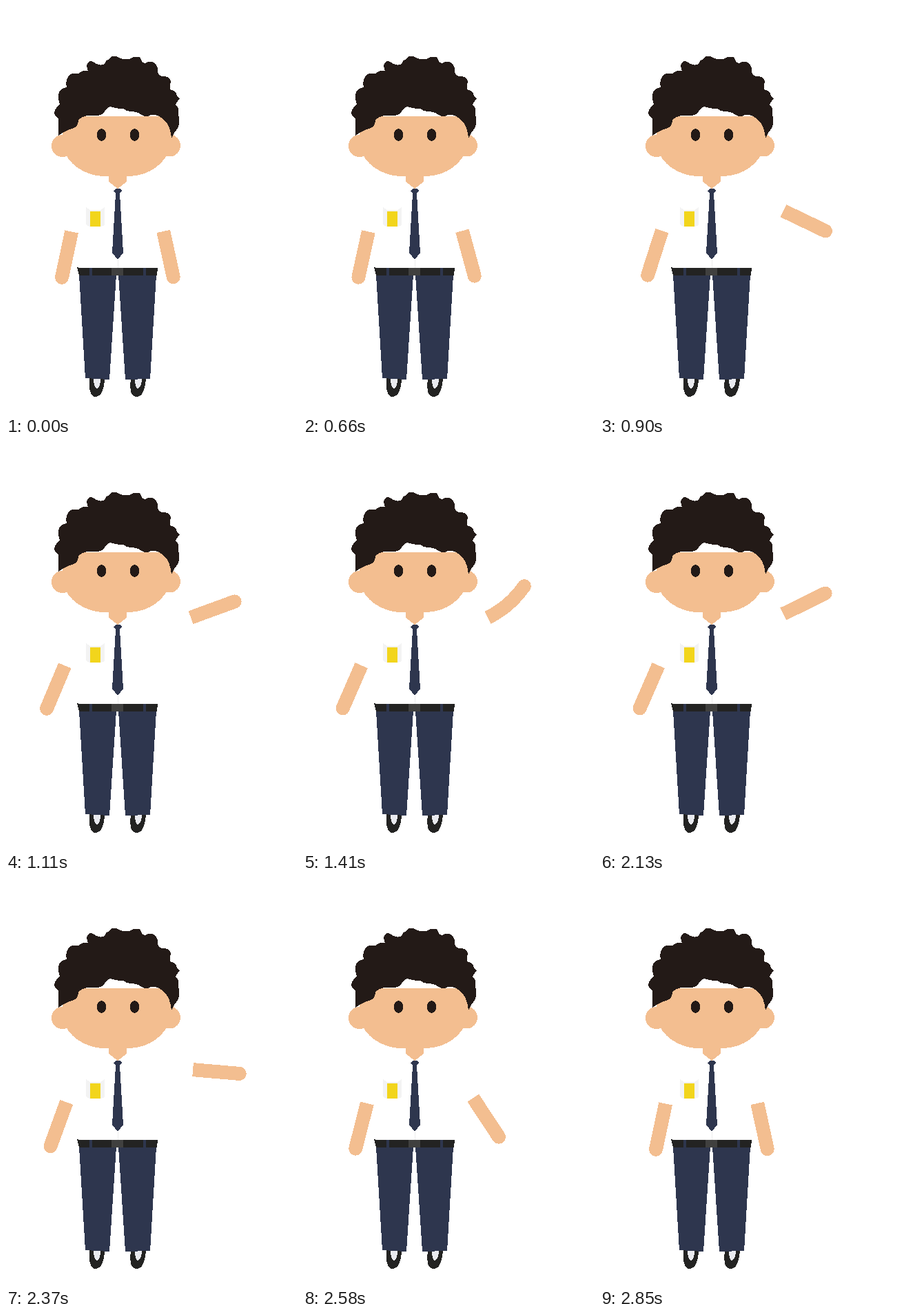
An HTML page that plays this animation: 422 by 592 pixels, repeating every 3300 ms.

```html
<!DOCTYPE html>
<html lang="en">
<head>
<meta charset="utf-8">
<title>Waving student</title>
<style>
  html, body { margin: 0; width: 100%; height: 100%; overflow: hidden; background: #fff; }
  svg { display: block; width: 100vw; height: 100vh; }
  .skin { fill: #f3be90; }
  .hair { fill: #231a17; }
  .navy { fill: #2e364e; }
  .belt { fill: #232322; }
  .sock { fill: #e9eaef; }
  .arm { fill: none; stroke: #f3be90; stroke-width: 20; }
</style>
</head>
<body>
<svg viewBox="0 0 422 592" shape-rendering="crispEdges">
  <g id="legs">
    <path class="belt" d="M121 540H143C143 553 139 567 130 567C122 567 120 556 121 540Z"/>
    <path class="belt" d="M181 540H203C202 553 199 567 190 567C181 567 179 558 181 540Z"/>
    <path class="sock" d="M127 540H137C137 549 135 555 132 555C129 555 127 549 127 540Z"/>
    <path class="sock" d="M187 540H197C197 549 194 555 191 555C188 555 187 549 187 540Z"/>
    <path class="navy" d="M106 390H160L150 542L115 540ZM163 390H218L209 541L173 542Z"/>
    <path class="belt" d="M103 379L107 380H220L219 391H106Z"/>
    <path class="navy" d="M121 380h4v11h-4zM199 380h4v11h-4z"/>
    <path fill="#40403f" d="M153 380h17v11h-17z"/>
  </g>
  <g id="arms">
    <path class="arm" id="leftArm"/><circle class="skin" id="leftHand" r="10"/>
    <path class="arm" id="rightArm"/><circle class="skin" id="rightHand" r="10"/>
  </g>
  <g id="shirt">
    <path class="skin" d="M149 243H175V255L162 265L149 255Z"/>
    <path stroke="#ececec" d="M162.5 368V380"/>
    <path class="navy" d="M156 268L159 265H166L168 268L165 272L170 358L162 368L154 358L159 272Z"/>
    <path fill="#f3f3f3" d="M116 292L122 296H137L143 292V318L138 320H121L116 317Z"/>
    <rect fill="#f2d51c" x="122" y="298" width="15" height="22"/>
  </g>
  <g id="head">
    <circle class="skin" cx="82" cy="203" r="16"/>
    <circle class="skin" cx="237" cy="202.500" r="16"/>
    <path class="skin" d="M80 160H240L238 205C232 228 207 247 178 247H142C115 247 87 228 83 205Z"/>
    <path class="hair" d="M76 188V163Q70 160 70 154Q72 147 78 143Q76 138 76 129Q77 120 88 118
      Q86 110 90 103Q93 96 105 98Q112 92 119 94Q115 85 120 81Q124 78 131 84Q138 87 143 84
      Q145 78 149 78Q153 71 160 73Q166 77 172 77Q179 78 183 75Q189 72 195 75Q197 83 202 83
      Q208 79 215 82Q222 89 220 96Q222 103 230 102Q238 103 239 110Q236 120 240 122
      Q247 123 248 131L252 134Q246 141 246 144Q252 147 250 158Q253 168 249 177Q244 183 240 192
      Q238 170 225 162Q215 155 208 159Q202 162 195 157Q190 153 180 153Q174 152 170 149
      Q159 149 152 146Q146 147 142 155Q135 161 122 159Q110 159 105 166Q104 176 98 177Q86 181 76 188Z"/>
    <ellipse class="hair eye" cx="138.500" cy="187" rx="6.700" ry="8.800"/>
    <ellipse class="hair eye" cx="186.500" cy="187" rx="6.700" ry="8.800"/>
  </g>
</svg>
<script>
  const LOOP = 3300, STEP = 30;
  const SLEEVE = 54.7, REACH = 122.5;
  const BLINKS = [150, 330, 1200, 2160], BLINK_TIME = 180;

  // [time, angle in degrees below the horizontal]
  const LEFT = [[600, 102], [1200, 113.5], [2150, 113.5], [2755, 102]];
  const ELBOW = [[600, 77.7], [1200, -26.4], [1400, -20], [1600, -17.5], [1800, -17.5],
                 [2000, -18], [2150, -26.4], [2755, 77.7]];
  const HAND = [[600, 77.7], [1200, -26.4], [1400, -31.8], [1600, -18], [1800, -27.5],
                [2000, -20], [2150, -26.4], [2755, 77.7]];

  const $ = id => document.getElementById(id);
  const eyes = document.querySelectorAll('.eye');
  const ease = u => u * u * (3 - 2 * u);

  function track(keys, t) {
    if (t <= keys[0][0]) return keys[0][1];
    for (let i = 1; i < keys.length; i++) {
      const [t0, a] = keys[i - 1], [t1, b] = keys[i];
      if (t < t1) return a + (b - a) * ease((t - t0) / (t1 - t0));
    }
    return keys[keys.length - 1][1];
  }

  function polar(x, y, r, deg) {
    const a = deg * Math.PI / 180;
    return [x + r * Math.cos(a), y + r * Math.sin(a)];
  }

  // Bare part of an arm, from the sleeve edge to the hand, bowed when the angles differ
  function drawArm(side, x, y, elbow, hand) {
    const [x0, y0] = polar(x, y, SLEEVE, elbow);
    const [x1, y1] = polar(x, y, REACH, hand);
    const chord = Math.atan2(y1 - y0, x1 - x0);
    const bow = Math.tan((chord - elbow * Math.PI / 180) * 0.7) / 2;
    const cx = (x0 + x1) / 2 - (y1 - y0) * -bow;
    const cy = (y0 + y1) / 2 - (x1 - x0) * bow;
    $(side + 'Arm').setAttribute('d', `M${x0} ${y0}Q${cx} ${cy} ${x1} ${y1}`);
    $(side + 'Hand').setAttribute('cx', x1);
    $(side + 'Hand').setAttribute('cy', y1);
  }

  function eyeOpen(t) {
    const start = BLINKS.find(b => t >= b && t < b + BLINK_TIME);
    if (start === undefined) return 1;
    return 1 - 0.9 * ease(1 - Math.abs((t - start) / BLINK_TIME * 2 - 1));
  }

  function draw(time) {
    const t = Math.floor((time % LOOP) / STEP) * STEP;
    const left = track(LEFT, t);
    drawArm('left', 106.5, 274, left, left);
    drawArm('right', 216.6, 273.5, track(ELBOW, t), track(HAND, t));
    const ry = 8.8 * eyeOpen(t);
    eyes.forEach(eye => eye.setAttribute('ry', ry));
  }

  let began;
  function tick(now) {
    began ??= now;
    draw(now - began);
    requestAnimationFrame(tick);
  }
  draw(0);
  requestAnimationFrame(tick);
</script>
</body>
</html>
```
